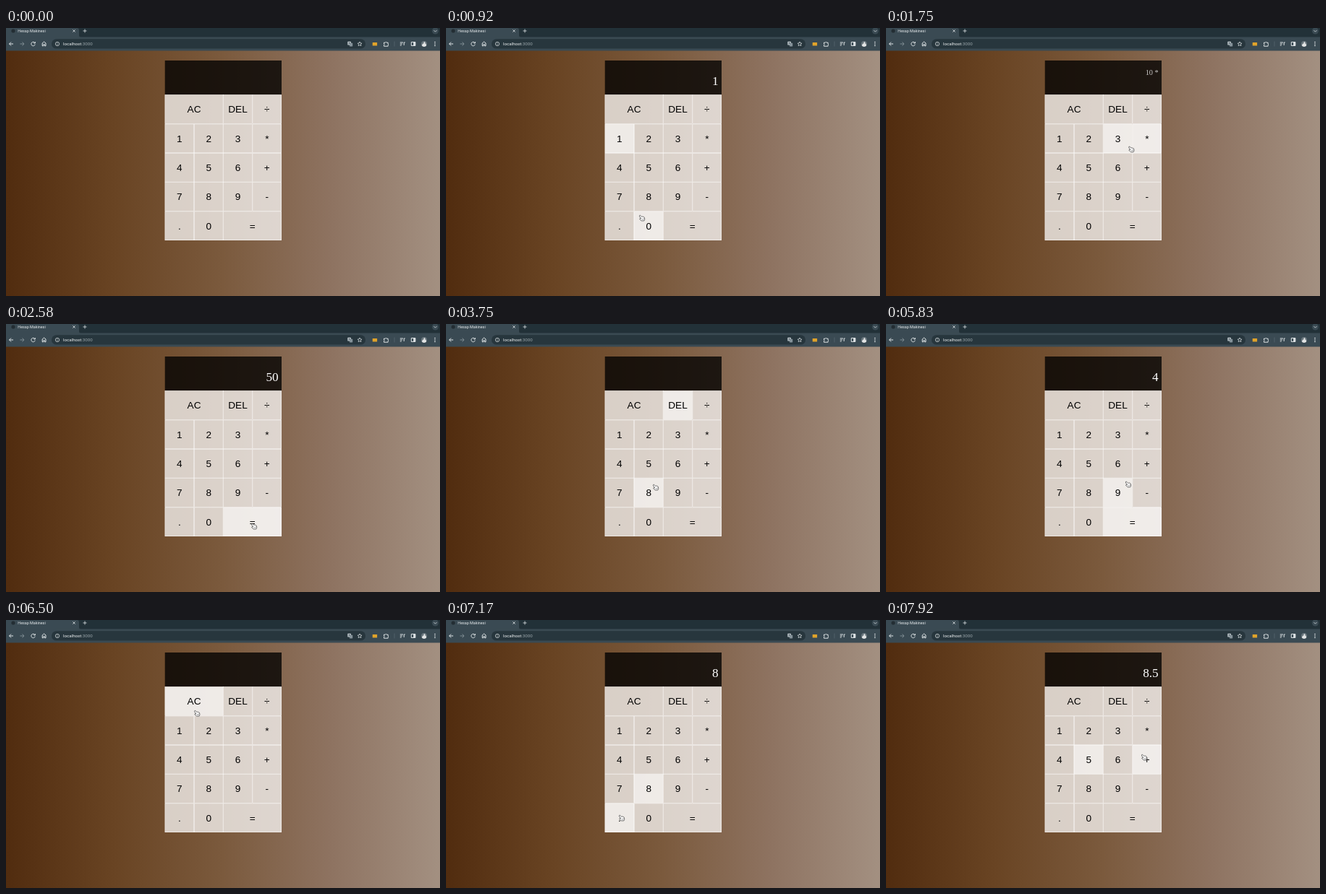
These frames come from a looping animation (600x371 px, 8 s). An HTML page:

```html
<!DOCTYPE html>
<html lang="tr">
<head>
<meta charset="utf-8">
<title>Hesap Makinesi</title>
<style>
html, body { margin: 0; width: 100%; height: 100%; overflow: hidden; background: #7b5a3c; }
svg { display: block; width: 100vw; height: 100vh; }
.ui { font-family: Roboto, "Liberation Sans", sans-serif; }
.key { font: 13.6px "Liberation Sans", Arial, sans-serif; text-anchor: middle; }
.out { font-family: "Liberation Serif", "Times New Roman", serif; text-anchor: end; fill: #fff; }
.icon { fill: none; stroke: #dfe4e6; stroke-width: 1; }
</style>
</head>
<body>
<svg id="stage" viewBox="0 0 600 371" xmlns="http://www.w3.org/2000/svg">
  <defs>
    <linearGradient id="bg">
      <stop offset="0" stop-color="#512c0f"/>
      <stop offset=".25" stop-color="#694423"/>
      <stop offset=".5" stop-color="#7b5a3d"/>
      <stop offset=".75" stop-color="#8e7361"/>
      <stop offset="1" stop-color="#a39081"/>
    </linearGradient>
  </defs>
  <rect width="600" height="371" fill="url(#bg)"/>

  <g class="ui">
    <rect width="600" height="14" fill="#223138"/>
    <path d="M0 0H98Q101 0 101 3V10Q101 13 104 13H0Z" fill="#3a4a53"/>
    <rect y="12.5" width="600" height="19" fill="#3a4a53"/>
    <rect x="63" y="15.2" width="434" height="13.4" rx="6.7" fill="#27363d"/>
    <circle cx="10" cy="4" r="2.6" fill="#232d33"/>
    <text x="16.3" y="5.9" font-size="5.4" fill="#e6eaec">Hesap Makinesi</text>
    <text x="79" y="24.2" font-size="6.2" fill="#eef1f2">localhost<tspan fill="#9aa5aa">:3000</tspan></text>
    <circle cx="593.5" cy="4" r="4.5" fill="#3a4a53"/>
    <g class="icon">
      <path d="M92.3 2.3l3.4 3.4m0-3.4l-3.4 3.4M106.5 4h5M109 1.500v5M591.500 3.200l2 2l2-2" stroke-width=".8"/>
      <path d="M10 22H4.500m2.500-2.500L4.500 22L7 24.500"/>
      <path d="M19.500 22H25m-2.500-2.500L25 22L22.500 24.500" stroke="#7f8c92"/>
      <path d="M39.900 20.700A2.700 2.700 0 1 0 40.200 22.600M40.300 19v2h-2"/>
      <path d="M50.200 24.800V21l2.400-2l2.400 2v3.800h-1.600v-2h-1.600v2Z"/>
      <circle cx="71" cy="22" r="2.700" stroke-width=".7"/>
      <path d="M71 21.700v1.800M71 20.300v.7" stroke-width=".7"/>
      <path d="M489 19l.9 2l2.100.2l-1.600 1.400l.5 2.100l-1.900-1.100l-1.900 1.100l.5-2.100l-1.600-1.400l2.100-.2Z" stroke-width=".7"/>
      <path d="M522.500 20.200h2q.8-1.800 1.600 0h2v1.800q1.700.8 0 1.600v1.600h-5.600v-1.600q1.600-.8 0-1.600Z"/>
      <path d="M544.800 20h4.200M544.800 22h3M544.800 24h2M550.200 24v-4h1.600"/>
      <path d="M560.300 19.500h5.600v5h-5.600Z"/>
      <path d="M537 18.500v7" stroke="#5c6b73" stroke-width=".7"/>
    </g>
    <rect x="472.300" y="18.800" width="4.600" height="4.800" rx=".6" fill="#c6ced2"/>
    <rect x="474.800" y="20.800" width="4.400" height="4.600" rx=".6" fill="#849299"/>
    <path d="M473.400 20.500h2.400m-1.200-.7v.7q0 1.500-1.300 2" fill="none" stroke="#37474f" stroke-width=".6"/>
    <rect x="506.700" y="20" width="6.400" height="4.400" rx=".5" fill="#e0a32a"/>
    <rect x="563.200" y="19.500" width="2.700" height="5" fill="#dfe4e6"/>
    <circle cx="578" cy="22" r="4" fill="#66737a"/>
    <path d="M575 24.800q0-3 2.500-3.300q-.5-2.500 1-2.500t1 2.500q1.800.3 1.500 3.300Q578 27 575 24.800Z" fill="#e2e4e4"/>
    <g fill="#dfe4e6"><circle cx="593" cy="19.600" r=".8"/><circle cx="593" cy="22" r=".8"/><circle cx="593" cy="24.400" r=".8"/></g>
  </g>

  <rect x="219.700" y="45" width="161.300" height="47.500" fill="#000" fill-opacity=".78"/>
  <text id="previous" class="out" x="376.700" font-size="10.300" fill-opacity=".75"></text>
  <text id="current" class="out" x="376.700" font-size="17.200"></text>
  <g id="keys"></g>

  <g id="cursor" stroke="#333" stroke-width=".7" stroke-linejoin="round">
    <path fill="#fff" d="M-3.600-2.900Q-3.500-4-2.400-3.600L-.2-1.500Q.3-2.300 1-1.600Q1.700-2.200 2.200-1.300Q3-1.600 3.300-.6L3.700 1.300Q3.800 2.400 3 3.800L-.8 4L-3.100 1.700Q-3.700 .8-2.600 .7L-1.300 1L-3.300-1.900Z"/>
    <path fill="none" stroke-width=".4" d="M.1 1v1.600M1.300 .8v1.600M2.400 .6v1.600"/>
  </g>
</svg>
<script>
const LOOP = 8000, FPS = 12;
const CELL = 40.32, LEFT = 219.7, TOP = 92.4;
const $ = id => document.getElementById(id);

// time, x, y of the pointer
const path = [
  [80, 204, 274], [580, 241, 157], [750, 241, 157], [920, 271, 263],
  [1080, 278, 270], [1250, 278, 270], [1500, 360, 157], [1670, 360, 157],
  [1920, 281, 198], [2080, 281, 198], [2330, 342, 279], [2580, 343, 280],
  [2670, 343, 280], [3000, 321, 118], [3420, 321, 118], [3670, 290, 226],
  [3920, 290, 226], [4330, 360, 116], [4500, 360, 116], [4920, 281, 158],
  [5080, 281, 158], [5420, 341, 275], [5670, 342, 275], [5830, 335, 222],
  [6170, 262, 116], [6420, 262, 116], [6830, 282, 237], [7000, 282, 237],
  [7170, 243, 274], [7330, 243, 274], [7580, 282, 197], [7750, 282, 197],
  [7920, 357, 190]
];
const presses = [
  [750, '1'], [1160, '0'], [1580, '*'], [2000, '5'], [2420, '='],
  [3160, 'DEL'], [3330, 'DEL'], [3910, '8'], [4410, '÷'], [5000, '2'],
  [5500, '='], [6250, 'AC'], [6910, '8'], [7330, '.'], [7660, '5']
];

const rows = ['AC AC DEL ÷', '1 2 3 *', '4 5 6 +', '7 8 9 -', '. 0 = ='];
const keys = rows.flatMap((line, row) => {
  const names = line.split(' ');
  return [...new Set(names)].map(name => ({
    name,
    x: LEFT + names.indexOf(name) * CELL,
    y: TOP + row * CELL,
    w: names.filter(n => n === name).length * CELL
  }));
});

function add(tag, attrs, text = '') {
  const el = document.createElementNS('http://www.w3.org/2000/svg', tag);
  for (const k in attrs) el.setAttribute(k, attrs[k]);
  el.textContent = text;
  return $('keys').appendChild(el);
}

for (const key of keys) {
  const { x, y, w, name } = key;
  key.rect = add('rect', { x, y, width: w, height: CELL, fill: '#fff' });
  add('rect', { x: x + .25, y: y + .25, width: w - .5, height: CELL - .5,
    fill: 'none', stroke: '#fff', 'stroke-width': .5, 'stroke-opacity': .9 });
  add('text', { class: 'key', x: x + w / 2, y: y + CELL / 2 + 4.8 }, name);
}

function pointerAt(t) {
  const i = path.findIndex(p => p[0] > t);
  if (i === 0) return null;
  if (i < 0) return path[path.length - 1].slice(1);
  const [t0, x0, y0] = path[i - 1], [t1, x1, y1] = path[i];
  const u = (t - t0) / (t1 - t0), e = u * u * (3 - 2 * u);
  return [x0 + (x1 - x0) * e, y0 + (y1 - y0) * e];
}

function keyAt(x, y) {
  return keys.find(k => x >= k.x && x < k.x + k.w && y >= k.y && y < k.y + CELL);
}

const operate = {
  '+': (a, b) => a + b, '-': (a, b) => a - b,
  '*': (a, b) => a * b, '÷': (a, b) => a / b
};

function calculate(t) {
  let current = '', previous = '', op = '', focus = '';
  for (const [time, key] of presses) {
    if (time > t) break;
    focus = key;
    if (key === 'AC') current = previous = op = '';
    else if (key === 'DEL') current = current.slice(0, -1);
    else if (key === '=') {
      current = String(operate[op](+previous, +current));
      previous = op = '';
    } else if (operate[key]) {
      [previous, current, op] = [current, '', key];
    } else current += key;
  }
  return { current, previous: op && `${previous} ${op}`, focus };
}

function show(id, text, top, size) {
  $(id).textContent = text;
  $(id).setAttribute('y', top + size * .891);
}

function render(ms) {
  const t = Math.floor((ms + 5) * FPS / 1000) * 1000 / FPS;
  const { current, previous, focus } = calculate(t + 5);

  // The two lines share the spare height evenly, as empty lines collapse.
  const h1 = previous ? 12 : 0, h2 = current ? 20 : 0;
  const gap = (39.6 - h1 - h2) / 4;
  show('previous', previous, 49 + gap, 10.3);
  show('current', current, 49 + 3 * gap + h1, 17.2);

  const pos = pointerAt(t + 4);
  const hover = pos && keyAt(pos[0] - 1, pos[1] - 3);
  for (const k of keys)
    k.rect.setAttribute('fill-opacity', k === hover || k.name === focus ? .88 : .73);
  $('cursor').setAttribute('visibility', hover ? 'visible' : 'hidden');
  if (hover) $('cursor').setAttribute('transform', `translate(${pos})`);
}

const start = performance.now();
function tick() {
  render((performance.now() - start) % LOOP);
  requestAnimationFrame(tick);
}
render(0);
requestAnimationFrame(tick);
</script>
</body>
</html>
```
